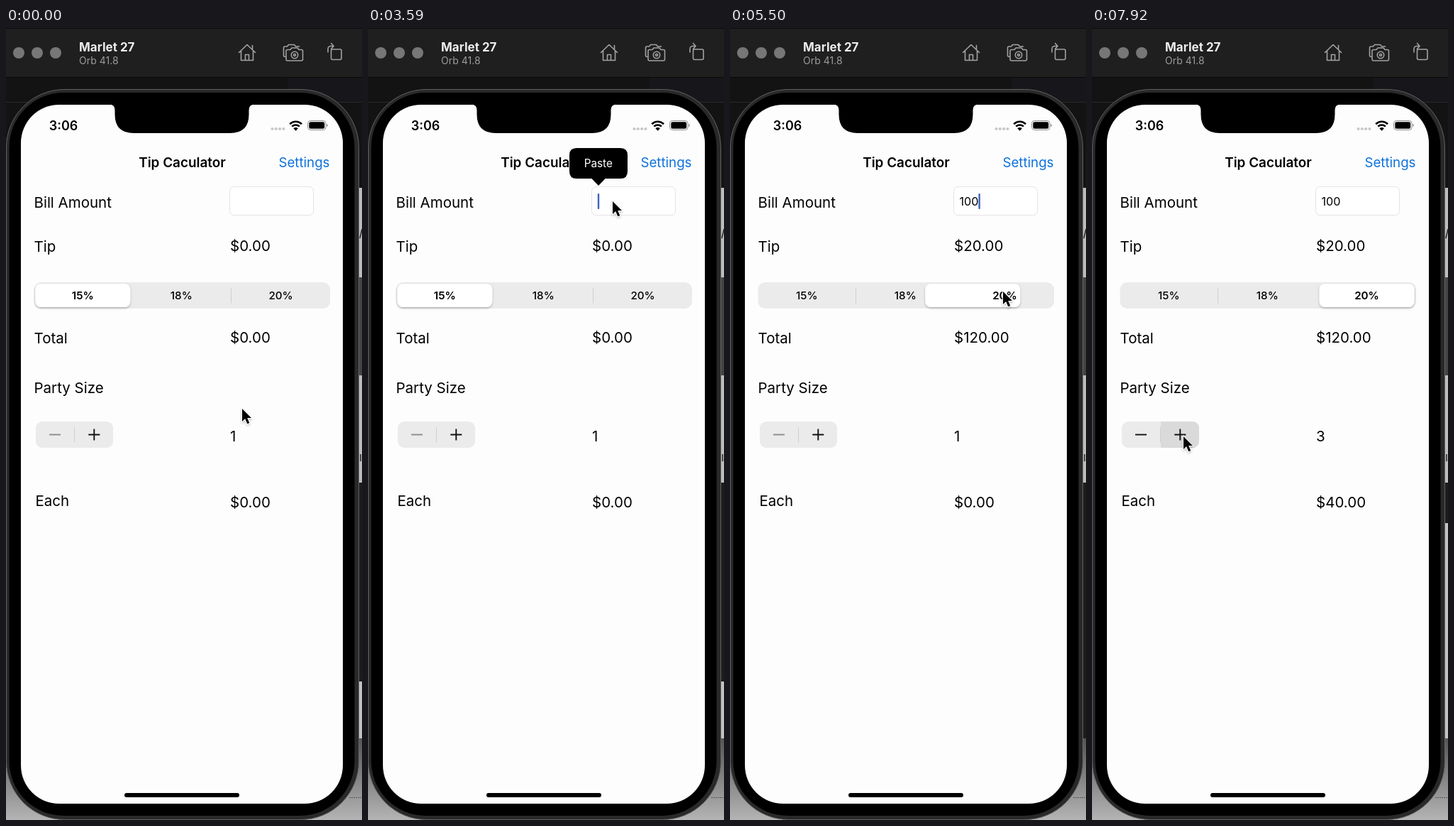
Write an HTML page that moves like this. It is 502 by 1115 pixels and loops after 8 s.

```html
<!DOCTYPE html>
<html lang="en">
<head>
<meta charset="utf-8">
<title>Tip calculator</title>
<style>
  html, body { margin: 0; width: 100%; height: 100%; overflow: hidden; background: #111; }
  svg { display: block; width: 502px; height: 1115px; font-family: Inter, Roboto, sans-serif; }
  .body { font-size: 20.5px; }
  .seg { font-size: 15.2px; font-weight: 500; text-anchor: middle; }
  .icon { fill: none; stroke: #a2a2a2; stroke-width: 1.6; stroke-linejoin: round; stroke-linecap: round; }
</style>
</head>
<body>
<svg viewBox="0 0 502 1115">
  <defs>
    <linearGradient id="floor" x2="0" y2="1">
      <stop stop-color="#555"/><stop offset="1" stop-color="#b4b4b4"/>
    </linearGradient>
    <filter id="soft" x="-30%" y="-30%" width="160%" height="180%">
      <feDropShadow dx="0" dy="1.5" stdDeviation="1.6" flood-opacity=".28"/>
    </filter>
  </defs>

  <!-- desktop behind the window -->
  <rect width="502" height="1115" fill="#131313"/>
  <path d="M397 69h105v36h-105z" fill="#16161b"/>
  <path d="M0 104.500h502" stroke="#292929"/>
  <path d="M495 225h7v126h-7zM495 489h7v151h-7z" fill="#bdbdbd"/>
  <path d="M495 351h7v138h-7z" fill="#444"/>
  <path d="M499 296l3-13M500 600v10" stroke="#222" stroke-width="1.500"/>
  <rect id="dark" x="495" y="640" width="7" fill="#1d1d1d"/>
  <rect id="light" x="495" width="7" fill="#c2c2c2"/>
  <rect y="1000" width="502" height="115" fill="url(#floor)"/>
  <path d="M484 1083.500h18" stroke="#555" stroke-dasharray="2 1"/>

  <!-- toolbar -->
  <rect width="502" height="69" fill="#1f1f1f"/>
  <path d="M0 .5h502M0 69.500h502" stroke="#0a0a0a"/>
  <g fill="#777"><circle cx="18" cy="35" r="8"/><circle cx="44" cy="35" r="8"/><circle cx="70" cy="35" r="8"/></g>
  <text x="103" y="33" font-size="17" font-weight="700" fill="#ededed">Marlet 27</text>
  <text x="103" y="51" font-size="14" fill="#9b9b9b">Orb 41.8</text>
  <g class="icon">
    <path d="M328.500 34.500L340 23.500l11.500 11M331.500 32v13.500h17V32M337.500 45.500v-8h5v8M347.500 30v-5.500"/>
    <path d="M394 40.500h-.5a2 2 0 0 1-2-2V28a2 2 0 0 1 2-2h3l2-2.500h8l2 2.500h5"/>
    <path d="M397 30.500h4l2-2.500h8l2 2.500h3.500a2 2 0 0 1 2 2V44a2 2 0 0 1-2 2H397a2 2 0 0 1-2-2V32.500a2 2 0 0 1 2-2z"/>
    <circle cx="407" cy="38" r="4.700"/><circle cx="407" cy="38" r="1.500"/>
    <rect x="458.500" y="30" width="14.500" height="14.500" rx="2"/>
    <path d="M454 34v-4.500a4 4 0 0 1 4-4h3.500M458.500 21.500l3.500 4-3.500 4"/>
  </g>

  <!-- phone -->
  <rect x=".5" y="86.500" width="497" height="1028" rx="82" fill="#292929" stroke="#626262"/>
  <rect x="4.500" y="91" width="487" height="1018" rx="77"/>
  <rect x="21" y="108" width="454" height="984" rx="54" fill="#fdfdfd"/>
  <path d="M146 107.500q7.500 .5 7.500 8v6q0 26.500 26.500 26.500h136q26.500 0 26.500-26.500v-6q0-7.500 7.500-8z"/>
  <rect x="167" y="1077" width="162" height="6" rx="3"/>

  <!-- status bar -->
  <text x="81" y="144" font-size="18" font-weight="600" text-anchor="middle">3:06</text>
  <g fill="#c8c8c8"><circle cx="375.500" cy="142" r="2.100"/><circle cx="380.800" cy="142" r="2.100"/><circle cx="386.100" cy="142" r="2.100"/><circle cx="391.400" cy="142" r="2.100"/></g>
  <g fill="none" stroke="#000" stroke-width="2.600">
    <path d="M400.200 135.200a12 12 0 0 1 16.800 0M403.300 138.600a7.700 7.700 0 0 1 10.600 0"/>
  </g>
  <path d="M405.300 141.300q3.300-2.600 6.600 0l-3.300 3.400z"/>
  <rect x="425.500" y="130.500" width="25.500" height="13" rx="3.800" fill="none" stroke="#8c8c8c"/>
  <rect x="427.300" y="132.300" width="21.900" height="9.400" rx="2.300"/>
  <path d="M452.300 135v4q1.600-.5 1.600-2t-1.600-2" fill="#8c8c8c"/>

  <!-- page -->
  <text x="248.500" y="195.500" font-size="18.900" font-weight="600" text-anchor="middle">Tip Caculator</text>
  <text x="456.500" y="195.500" font-size="18.700" fill="#0d72dc" text-anchor="end">Settings</text>
  <g class="body">
    <text x="39.500" y="253">Bill Amount</text>
    <text x="39.500" y="314.500">Tip</text>
    <text x="39.500" y="444">Total</text>
    <text x="39.500" y="514">Party Size</text>
    <text x="41.500" y="672.500">Each</text>
    <text x="316" y="313.500" id="tip"></text>
    <text x="316" y="443" id="total"></text>
    <text x="316" y="581.500" id="size"></text>
    <text x="316" y="674.500" id="each"></text>
  </g>
  <rect x="315.500" y="223.500" width="118" height="40" rx="6" fill="#fff" stroke="#e3e3e3"/>
  <text x="323.500" y="249.800" font-size="16.200" id="bill"></text>
  <rect id="caret" y="233" width="2.400" height="22" rx="1" fill="#3f62bd"/>

  <rect x="39.500" y="358" width="417.500" height="37" rx="10" fill="#ebebeb"/>
  <path id="rule" d="M0 366.500v21" stroke="#cfcfcf"/>
  <rect id="knob" y="360" width="134" height="33" rx="8" fill="#fff" filter="url(#soft)"/>
  <g class="seg">
    <text x="108.300" y="382" id="low">15%</text>
    <text x="247.300" y="382">18%</text>
    <text x="387.500" y="382" id="high">20%</text>
  </g>

  <rect x="42" y="554" width="109" height="37" rx="9" fill="#ebebeb"/>
  <path id="press" d="M97 554h45a9 9 0 0 1 9 9v19a9 9 0 0 1-9 9H97z" fill="#dadada"/>
  <path d="M96.500 562v21.500" stroke="#cfcfcf"/>
  <path id="minus" d="M61 572.500h16" stroke-width="1.900"/>
  <path d="M116.300 572.500h16M124.300 564.500v16" stroke="#111" stroke-width="1.900"/>

  <g id="menu">
    <path d="M294 169h62q10 0 10 10v23q0 10-10 10H334.500L325 222l-9.500-10H294q-10 0-10-10V179q0-10 10-10z"/>
    <text x="324.800" y="196" font-size="15.300" fill="#fff" text-anchor="middle">Paste</text>
  </g>
  <path id="cursor" d="M0 0v18l4.100-3.900 3.200 7.200 3-1.300-3.100-7h5.800z" stroke="#fff" stroke-width="1.800" paint-order="stroke" filter="url(#soft)"/>
</svg>

<script>
const LOOP = 8000, STEP = 1000 / 12;
const $ = id => document.getElementById(id);
const set = (id, attrs) => { for (const k in attrs) $(id).setAttribute(k, attrs[k]); };
const clamp = v => Math.max(0, Math.min(1, v));
const ramp = (t, a, b) => clamp((t - a) / (b - a));
const smooth = p => p * p * (3 - 2 * p);
const money = v => '$' + v.toFixed(2);

// pointer stops: arrival time, x, y
const stops = [
  [0, 333, 536], [170, 311, 459], [510, 311, 459], [1240, 365, 237],
  [2670, 365, 237], [3250, 345, 244], [4000, 345, 244], [4830, 397, 380],
  [4870, 397, 380], [5170, 385, 371], [5510, 385, 371], [6080, 129, 575],
  [LOOP, 129, 575]
];

function pointer(t) {
  const i = stops.findIndex(s => s[0] > t);
  const [t0, x0, y0] = stops[i - 1], [t1, x1, y1] = stops[i];
  const p = smooth(ramp(t, t0, t1));
  return [x0 + (x1 - x0) * p, y0 + (y1 - y0) * p];
}

function caretAlpha(t) {
  if (t < 1900) return 0;
  if (t >= 3420 && t < 4080) return 1;
  const p = (t - (t < 3420 ? 1900 : 4080)) % 1000 / 1000;
  return Math.max(1 - ramp(p, .52, .7), ramp(p, .85, 1));
}

function draw(t) {
  const typed = [3740, 3910, 4080].filter(k => t >= k).length;
  const picked = t >= 5330;
  const size = 1 + (t >= 6995) + (t >= 7740);
  const tip = picked ? 20 : 0, total = picked ? 120 : 0;

  $('bill').textContent = '100'.slice(0, typed);
  $('tip').textContent = money(tip);
  $('total').textContent = money(total);
  $('size').textContent = size;
  $('each').textContent = money(size > 1 ? total / size : 0);
  set('caret', {
    x: 323.8 + (typed ? $('bill').getComputedTextLength() - .4 : 0),
    opacity: caretAlpha(t)
  });

  const slide = 1 - (1 - ramp(t, 5300, 5740)) ** 3;
  set('knob', { x: 41.3 + 279.2 * slide });
  set('rule', { transform: `translate(${picked ? 177.5 : 317.5})` });
  set('low', { 'font-weight': picked ? 500 : 600 });
  set('high', { 'font-weight': picked ? 600 : 500 });

  const held = t < 7740 ? ramp(t, 6910, 7080) - ramp(t, 7250, 7500) : ramp(t, 7660, 7830);
  set('press', { opacity: held });
  set('minus', { stroke: size > 1 ? '#111' : '#8c8c8c' });
  set('menu', { opacity: ramp(t, 3440, 3570) - ramp(t, 3660, 3800) });
  set('cursor', { transform: `translate(${pointer(t)})` });

  const edge = t < 4200 ? 920 : t < 5900 ? 1000 : 697;
  set('dark', { height: edge - 640 });
  set('light', { y: edge, height: 1115 - edge });
}

function tick() {
  const t = performance.now() % LOOP;
  draw(Math.floor(t / STEP + .02) * STEP % LOOP);
  requestAnimationFrame(tick);
}
tick();
</script>
</body>
</html>
```
